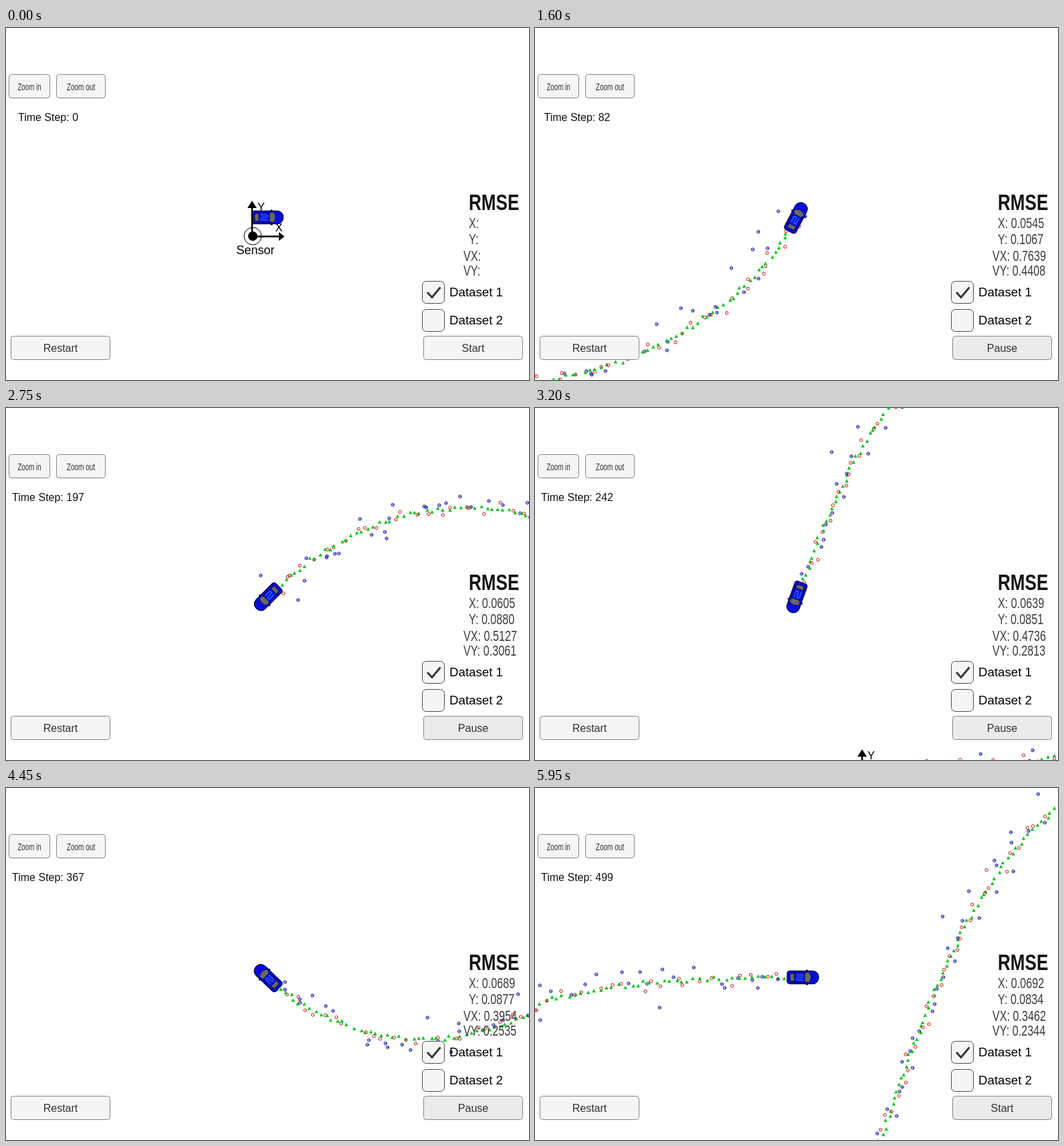
These frames come from a looping animation (782 by 526 pixels, 6 s). An HTML page with a canvas:

```html
<!DOCTYPE html>
<html lang="en">
<head>
<meta charset="utf-8">
<title>Sensor fusion simulator</title>
<style>
  html, body { margin: 0; width: 100%; height: 100%; overflow: hidden; background: #fff; }
  canvas { display: block; }
</style>
</head>
<body>
<canvas id="stage" width="782" height="526"></canvas>
<script>
const ctx = document.getElementById('stage').getContext('2d');
const W = 782, H = 526, LOOP = 6000, TICK = 50;
const CX = 391, CY = 283;          // where the camera keeps the car
const SCALE = 36.7;                // pixels per metre
const DT = 0.05, LAST = 499;
const FONT = '"Liberation Sans", Arial, sans-serif';

// Seeded noise
let seed = 7;
function rand() {
  seed = (seed + 0x6D2B79F5) | 0;
  let r = Math.imul(seed ^ (seed >>> 15), 1 | seed);
  r = (r + Math.imul(r ^ (r >>> 7), 61 | r)) ^ r;
  return ((r ^ (r >>> 14)) >>> 0) / 4294967296;
}
const gauss = () => Math.sqrt(-2 * Math.log(1 - rand())) * Math.cos(2 * Math.PI * rand());

// Figure-eight drive: yaw rate and speed are sinusoids with a 25 s period
const OMEGA = 2 * Math.PI / 25;
const yawAt = t => 0.55 / OMEGA * (1 - Math.cos(OMEGA * t));
const speedAt = t => 5 + 0.2 * Math.cos(2 * OMEGA * t);

const path = [{ x: 0.6, y: 0.6, yaw: 0 }];
for (let k = 0; k <= LAST; k++) {
  const mid = (k + 0.5) * DT, d = speedAt(mid) * DT, p = path[k];
  path.push({
    x: p.x + d * Math.cos(yawAt(mid)),
    y: p.y + d * Math.sin(yawAt(mid)),
    yaw: yawAt((k + 1) * DT)
  });
}

// Lidar and radar take turns; the estimate wanders slightly around the path
const marks = path.slice(0, LAST + 1).map((p, k) => {
  const lidar = k % 2 === 0;
  const guess = { x: p.x + 0.05 * gauss(), y: p.y + 0.05 * gauss() };
  let seen;
  if (lidar) {
    seen = { x: p.x + 0.15 * gauss(), y: p.y + 0.15 * gauss() };
  } else {
    const r = Math.hypot(p.x, p.y) + 0.3 * gauss();
    const a = Math.atan2(p.y, p.x) + 0.03 * gauss();
    seen = { x: r * Math.cos(a), y: r * Math.sin(a) };
  }
  return { lidar, guess, seen };
});

// RMSE readings at a few steps; squared sums are interpolated between them
const KNOTS = [0, 8, 82, 152, 242, 367, 452, 499];
const RMSE = [
  ['X:', 692, 299, [0.12, 0.068, 0.0545, 0.0546, 0.0639, 0.0689, 0.0690, 0.0692]],
  ['Y:', 692, 323, [0.10, 0.140, 0.1067, 0.0924, 0.0851, 0.0877, 0.0851, 0.0834]],
  ['VX:', 684, 348, [5.2, 2.25, 0.7639, 0.5694, 0.4736, 0.3954, 0.3607, 0.3462]],
  ['VY:', 684, 370, [0.2, 1.20, 0.4408, 0.3417, 0.2813, 0.2535, 0.2378, 0.2344]]
];
function rmseAt(values, step) {
  let i = 0;
  while (i < KNOTS.length - 2 && step > KNOTS[i + 1]) i++;
  const sum = j => values[j] ** 2 * (KNOTS[j] + 1);
  const f = (step - KNOTS[i]) / (KNOTS[i + 1] - KNOTS[i]);
  return Math.sqrt((sum(i) + (sum(i + 1) - sum(i)) * f) / (step + 1)).toFixed(4);
}

// Drawing helpers
function text(str, x, y, size, { color = '#111', align = 'left', squeeze = 1, weight = '' } = {}) {
  ctx.save();
  ctx.translate(x, y);
  ctx.scale(squeeze, 1);
  ctx.font = `${weight} ${size}px ${FONT}`;
  ctx.textAlign = align;
  ctx.fillStyle = color;
  ctx.fillText(str, 0, 0);
  ctx.restore();
}

function box(x, y, w, h, r, fill, stroke) {
  ctx.beginPath();
  ctx.roundRect(x + 0.5, y + 0.5, w - 1, h - 1, r);
  ctx.fillStyle = fill;
  ctx.fill();
  ctx.strokeStyle = stroke;
  ctx.lineWidth = 1;
  ctx.stroke();
}

function poly(points, closed = true) {
  ctx.beginPath();
  points.forEach(([x, y]) => ctx.lineTo(x, y));
  if (closed) ctx.closePath();
}

function disc(x, y, r) {
  ctx.beginPath();
  ctx.arc(x, y, r, 0, 2 * Math.PI);
}

function button(label, x, y, w, fill = '#f5f5f5', squeeze = 1) {
  const small = squeeze < 1;
  box(x, y, w, 36, 4, fill, '#858585');
  text(label, x + w / 2, y + (small ? 24 : 24), small ? 15 : 16,
    { color: '#323232', align: 'center', squeeze });
}

function drawMarks(step, at) {
  ctx.lineWidth = 1;
  for (const { lidar, guess, seen } of marks.slice(0, step + 1)) {
    const [x, y] = at(seen);
    disc(x, y, 2.2);
    ctx.strokeStyle = lidar ? '#c80f0f' : '#0c0c9c';
    ctx.stroke();
    if (!lidar) {
      poly([[x - 1, y], [x + 2, y]], false);
      ctx.stroke();
    }
    const [gx, gy] = at(guess);
    poly([[gx - 2.7, gy + 2.5], [gx, gy - 2.7], [gx + 2.7, gy + 2.5]]);
    ctx.fillStyle = '#0fc31c';
    ctx.fill();
  }
}

function drawCar(x, y, yaw) {
  ctx.save();
  ctx.translate(x, y);
  ctx.rotate(-yaw);
  ctx.fillStyle = '#00005a';
  for (const side of [-1, 1]) {
    disc(6, side * 10.3, 1.5);
    ctx.fill();
  }
  ctx.beginPath();
  ctx.roundRect(-23.5, -9.7, 47, 19.4, [4, 9, 9, 4]);
  ctx.fillStyle = '#0a0adc';
  ctx.fill();
  ctx.strokeStyle = '#00003c';
  ctx.lineWidth = 1.2;
  ctx.stroke();
  // cabin
  ctx.beginPath();
  ctx.roundRect(-20, -8, 32, 16, 5);
  ctx.fillStyle = '#0a0a96';
  ctx.fill();
  ctx.fillStyle = '#67676c';
  ctx.lineWidth = 0.8;
  ctx.strokeStyle = '#14143c';
  poly([[-19, -5], [-13, -6], [-13, 6], [-19, 5]]);
  ctx.fill();
  ctx.stroke();
  poly([[3, -6], [8, -8], [11, -5], [12, 0], [11, 5], [8, 8], [3, 6]]);
  ctx.fill();
  ctx.stroke();
  ctx.fillStyle = '#0a14e6';
  ctx.fillRect(-12, -6, 14, 12);
  ctx.strokeStyle = '#3c82f0';
  ctx.lineWidth = 1;
  poly([[-10, -4], [-1, -4], [1, -2], [-1, 0], [-8, 0], [-10, 2], [-8, 4], [1, 4]], false);
  ctx.stroke();
  ctx.restore();
}

function drawSensor(x, y) {
  ctx.save();
  ctx.translate(x, y);
  ctx.strokeStyle = ctx.fillStyle = '#000';
  ctx.lineWidth = 1;
  disc(0, 0, 13);
  ctx.stroke();
  disc(0, 0, 7);
  ctx.fill();
  ctx.lineWidth = 2.6;
  poly([[-1, -44], [-1, 0.5], [41, 0.5]], false);
  ctx.stroke();
  poly([[-8, -42], [-1, -53], [6, -42]]);
  ctx.fill();
  poly([[39, -6], [47.5, 0.5], [39, 7]]);
  ctx.fill();
  text('Y', 7, -38, 16.5, { color: '#000' });
  text('X', 33.5, -7, 16.5, { color: '#000' });
  text('Sensor', -24.5, 27, 18, { color: '#000' });
  ctx.restore();
}

function drawPanel(step) {
  button('Zoom in', 4, 69, 62, undefined, 0.65);
  button('Zoom out', 75, 69, 74, undefined, 0.67);
  text('Time Step: ' + step, 63, 139, 16, { align: 'center' });

  text('RMSE', 692, 272, 33, { color: '#141414', squeeze: 0.79, weight: 'bold' });
  for (const [label, x, y, values] of RMSE) {
    const value = step ? ' ' + rmseAt(values, step) : '';
    text(label + value, x, y, 22, { color: '#3c3c3c', squeeze: 0.735 });
  }

  box(622, 378, 34, 34, 6, '#f5f5f5', '#4b4b4b');
  box(622, 420, 34, 34, 6, '#f5f5f5', '#4b4b4b');
  poly([[630, 395], [637, 402.5], [649.5, 387.5]], false);
  ctx.strokeStyle = '#373737';
  ctx.lineWidth = 3;
  ctx.stroke();
  text('Dataset 1', 663, 401, 18.7, { color: '#000' });
  text('Dataset 2', 663, 443, 18.7, { color: '#000' });

  const running = step > 0 && step < LAST;
  button('Restart', 7, 460, 149);
  button(running ? 'Pause' : 'Start', 624, 460, 149, step ? '#ebebeb' : '#f5f5f5');
}

function draw(time) {
  const tick = Math.floor(time / TICK);
  const step = Math.max(0, Math.min(LAST, 5 * tick - 78));
  const car = path[step ? step + 1 : 0];
  const cam = step === LAST ? path[LAST] : car;
  const at = p => [CX + (p.x - cam.x) * SCALE, CY - (p.y - cam.y) * SCALE];

  ctx.fillStyle = '#fff';
  ctx.fillRect(0, 0, W, H);
  if (step) drawMarks(step, at);
  drawCar(...at(car), car.yaw);
  const [sx, sy] = at({ x: 0, y: 0 });
  drawSensor(sx + (step ? 9 : 0), sy + 6);
  drawPanel(step);
}

const begin = performance.now();
function loop() {
  draw((performance.now() - begin) % LOOP);
  requestAnimationFrame(loop);
}
loop();
</script>
</body>
</html>
```
